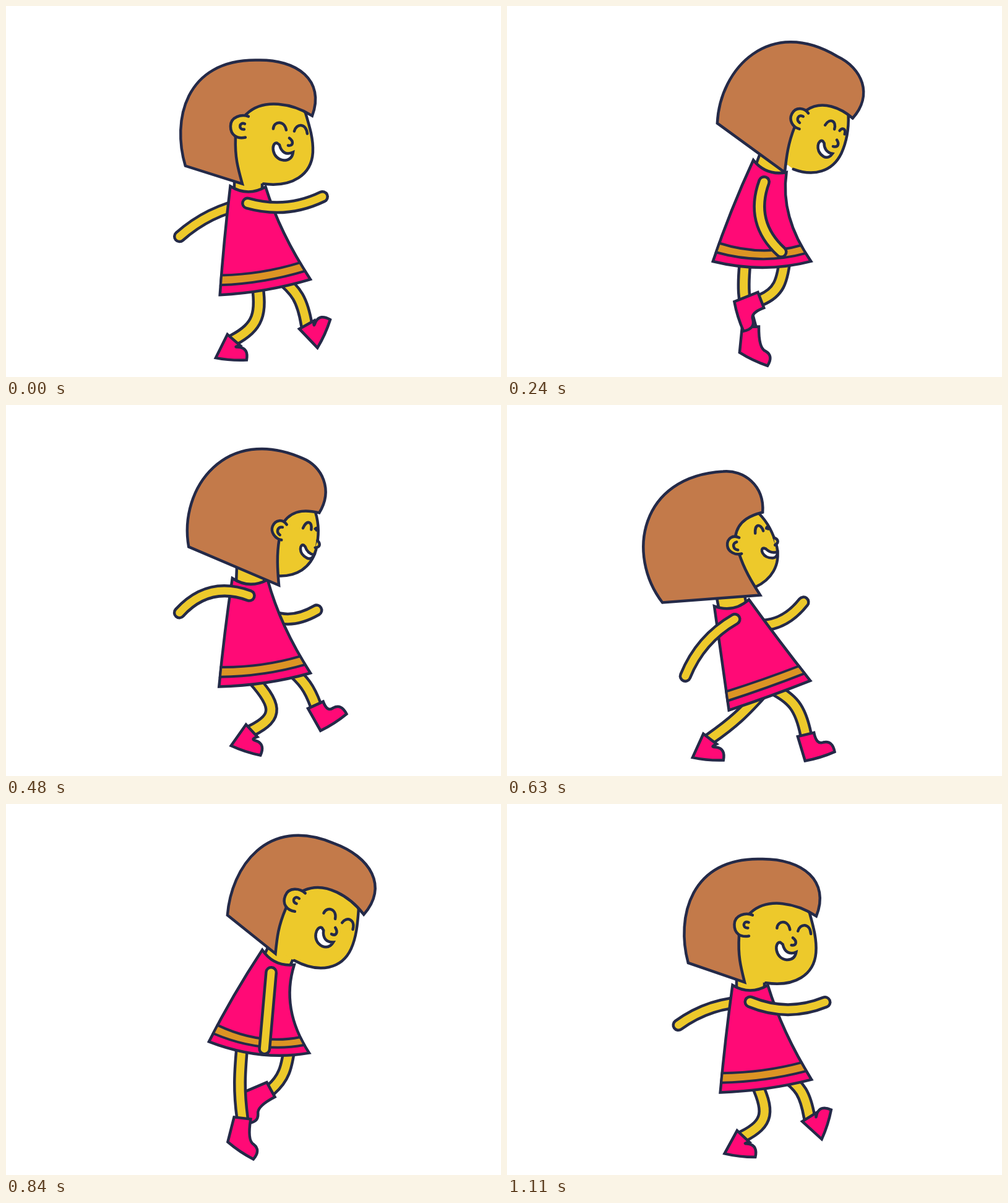
An HTML page with a canvas for the animation above (1140 ms loop, 800x600 px).

```html
<!DOCTYPE html>
<html lang="en">
<head>
<meta charset="utf-8">
<title>Skipping girl</title>
<style>
  html, body { margin: 0; width: 100%; height: 100%; overflow: hidden; background: #fff; }
  canvas { display: block; width: 100vw; height: 100vh; }
</style>
</head>
<body>
<canvas id="stage" width="800" height="600"></canvas>
<script>
const LOOP = 1140, HALF = LOOP / 2, STEP = 30;
const INK = '#242a48', SKIN = '#edc92b', HAIR = '#c37a4a', PINK = '#ff0a76', GOLD = '#dc9424';
const ctx = document.getElementById('stage').getContext('2d');

// Key poses, joined by a periodic cubic. The rest of the rig follows from these.

// time, collar x, collar y, collar tilt, head tilt
const BODY = [
  [0, 391, 292, 1, 17.5], [120, 414, 320, 9.5, 22], [285, 422, 243, 22, 41],
  [360, 406, 247, 20, 46.6], [540, 386, 300, -6, 9], [630, 363, 320, -11, -4.3],
  [700, 387, 319, -1, 6], [840, 440, 248, 25, 38.7], [890, 441, 241, 26, 43],
  [990, 418, 278, 22, 41], [1110, 393, 293, 0, 19]
];
// time, angle from hanging straight down, elbow bend
const SWING = [
  [0, 95, 23], [60, 104, 44], [120, 66, 56], [360, -33, 28], [420, -64, 48], [555, -69, 18],
  [630, -41, 21], [690, -58, 50], [840, -5, 0], [930, 52, 20], [990, 65, 57]
];
// time, hip x, knee, ankle, foot angle
const STRIDE = [
  [0, 405, 417, 513, 368, 540, 4], [60, 418, 374, 508, 328, 540, 5],
  [120, 400, 402, 550, 345, 547, 9], [270, 459, 453, 440, 428, 462, 84],
  [360, 455, 472, 420, 479, 455, 90], [420, 460, 487, 439, 501, 467, 30],
  [555, 444, 479, 463, 487, 511, -72], [630, 424, 472, 479, 483, 533, -17],
  [690, 440, 477, 503, 487, 547, 5], [840, 383, 375, 456, 382, 508, 34],
  [930, 425, 462, 440, 410, 474, 77], [990, 398, 461, 475, 405, 506, 41]
];

// head parts: outline in three-quarter view, outline in profile, fill
const FRONT = { x: 381, y: 287, tilt: 17.5 }, SIDE = { x: 412, y: 310, tilt: -4.3 };
const PARTS = [
  ['M378 282 C372 262 366 235 367 213 C367 150 440 120 483 172 C490 195 496 215 495 236 C493 272 462 293 415 287',
   'M400 293 C388 272 376 250 374 235 C364 190 385 165 410 178 C425 193 434 212 439 232 C445 262 430 285 404 297', SKIN],
  ['M289 258 C267 185 288 86 404 87 C470 85 515 120 494 177 C462 157 415 148 388 174 C375 185 369 200 370 213 C369 245 374 262 381 287 Z',
   'M254 322 C195 245 217 118 352 110 C385 107 419 132 416 176 C400 180 376 188 372 215 C372 225 374 235 378 243 C386 268 398 288 412 310 Z', HAIR],
  ['M391 178 C380 174 362 178 362 194 C362 208 372 215 386 212',
   'M378 217 C368 212 358 218 359 230 C360 240 372 246 382 243', SKIN],
  ['M385 190 C376 186 374 200 384 199', 'M374 224 C366 226 368 236 376 237'],
  ['M431 198 C432 185 449 184 452 200', 'M404 210 C403 194 413 194 417 206'],
  ['M465 202 C468 189 484 188 486 206', 'M422 202 C423 199 424 199 425 203'],
  ['M457 213 C464 218 464 226 455 225', 'M434 217 C440 219 444 224 436 229', SKIN],
  ['M437 221 C427 220 428 247 448 249 C458 249 462 243 463 236 C452 241 444 236 441 224 Z',
   'M418 234 C411 234 415 250 432 250 C438 250 440 245 440 240 C431 243 424 238 421 235 Z', '#fff']
].map(([a, b, fill]) => ({ shape: a, front: local(a, FRONT), side: local(b, SIDE), fill }));

function spin(x, y, deg) {
  const r = deg * Math.PI / 180, c = Math.cos(r), s = Math.sin(r);
  return [x * c - y * s, x * s + y * c];
}

function local(d, view) {
  const n = d.match(/\d+/g).map(Number), out = [];
  for (let i = 0; i < n.length; i += 2) out.push(...spin(n[i] - view.x, n[i + 1] - view.y, -view.tilt));
  return out;
}

const mix = (a, b, k) => a + (b - a) * k;
const angle = (x, y) => Math.atan2(y, x) * 180 / Math.PI;

function ease(u) {
  const k = Math.min(1, Math.max(0, u));
  return k * k * (3 - 2 * k);
}

function sample(rows, time) {
  const n = rows.length, t = (time % LOOP + LOOP) % LOOP;
  let i = n - 1;
  while (rows[i][0] > t) i--;
  const row = k => rows[(k + n) % n];
  const gap = k => (row(k + 1)[0] - row(k)[0] + LOOP) % LOOP;
  const h0 = gap(i - 1), h = gap(i), h1 = gap(i + 1), u = (t - row(i)[0]) / h;
  return row(i).slice(1).map((p, j) => {
    const q = row(i + 1)[j + 1], d = (q - p) / h;
    const before = (p - row(i - 1)[j + 1]) / h0, after = (row(i + 2)[j + 1] - q) / h1;
    const m0 = (before * h + d * h0) / (h + h0) * h;
    const m1 = (d * h1 + after * h) / (h + h1) * h;
    const a = 2 * (p - q) + m0 + m1, b = 3 * (q - p) - 2 * m0 - m1;
    return ((a * u + b) * u + m0) * u + p;
  });
}

function paint(d, fill, line = 4.5) {
  const path = new Path2D(d);
  if (fill) { ctx.fillStyle = fill; ctx.fill(path); }
  ctx.strokeStyle = INK;
  ctx.lineWidth = line;
  ctx.stroke(path);
}

function limb(d, wide, thin) {
  const path = new Path2D(d);
  for (const [color, width] of [[INK, wide], [SKIN, thin]]) {
    ctx.strokeStyle = color;
    ctx.lineWidth = width;
    ctx.stroke(path);
  }
}

// The hem swings against the collar, and the dress shortens as she bows.
function pose(t) {
  const [x, y, tilt, nod] = sample(BODY, t), sway = x - 400;
  const hemX = 417 - .2 * sway, length = 165 - .026 * tilt * tilt;
  return {
    x, y, tilt, nod, hemX,
    hemY: y + Math.sqrt(length ** 2 - (hemX - x) ** 2),
    hemTilt: .6 * sway - .55 * tilt - 3.8,
    hemHalf: 75.5 + .15 * sway
  };
}

function arm(body, t) {
  const [swing, bend] = sample(SWING, t);
  const [ox, oy] = spin(0, 27, body.tilt), [dx, dy] = spin(0, 1, -swing);
  const x = body.x + ox, y = body.y + oy, reach = 124 - bend * bend / 200;
  const cx = x + dx * reach / 2 - dy * bend, cy = y + dy * reach / 2 + dx * bend;
  limb(`M${x} ${y} Q${cx} ${cy} ${x + dx * reach} ${y + dy * reach}`, 21, 12);
}

function leg(body, t) {
  const [hx, kx, ky, ax, ay, foot] = sample(STRIDE, t);
  const hy = body.hemY - 14 + (hx - body.hemX) * Math.tan(body.hemTilt * Math.PI / 180);
  const k = .8;
  limb(`M${hx} ${hy} C${mix(hx, kx, k)} ${mix(hy, ky, k)} ${mix(ax, kx, k)} ${mix(ay, ky, k)} ${ax} ${ay}`, 22, 13);

  // the cuff turns partly with the shin, partly with the foot
  const shin = angle(ax - kx, ay - ky), cuff = mix((shin + 360) % 360 - 90, foot, .35);
  const [ux, uy] = spin(1, 0, cuff), [sx, sy] = spin(1, 0, foot);
  const back = 12 + .25 * (foot - cuff), len = 50;
  const heelX = ax - uy * 41 - ux * back, heelY = ay + ux * 41 - uy * back;
  const at = (along, up) => `${heelX + sx * along + sy * up} ${heelY + sy * along - sx * up}`;
  const edge = w => `${ax + ux * w} ${ay + uy * w}`;
  paint(`M${edge(-13.5)} L${edge(13.5)} Q${at(len - 25, 19)} ${at(len - 13, 20)}
    Q${at(len + 2, 19)} ${at(len, 0)} Q${at(len / 2, -3)} ${at(0, 0)} Z`, PINK);
}

function dress({ x, y, tilt, hemX, hemY, hemTilt, hemHalf }) {
  const [ux, uy] = spin(1, 0, tilt), [bx, by] = spin(hemHalf, 0, hemTilt);
  const collar = (along, up) => [x + ux * along + uy * up, y + uy * along - ux * up];
  paint(`M${collar(-22, -8)} L${collar(-22, 25)} L${collar(23, 25)} L${collar(23, -8)}`, SKIN);

  const bend = 6 + .45 * tilt, sag = 8 + .6 * tilt;
  const side = (dir, pull) => {
    const a = collar(28.5 * dir, 0), b = [hemX + bx * dir, hemY + by * dir];
    const c = [(a[0] + b[0]) / 2 - pull, (a[1] + b[1]) / 2];
    const at = v => a.map((p, i) => mix(mix(p, c[i], v), mix(c[i], b[i], v), v));
    return { a, c, at };
  };
  const left = side(-1, bend / 3), right = side(1, bend * 2);
  const hem = v => {
    const p = left.at(v), q = right.at(v);
    const mid = [(p[0] + q[0]) / 2 + 2, (p[1] + q[1]) / 2 + sag];
    return { out: `${p} Q${mid} ${q}`, back: `${q} Q${mid} ${p}` };
  };
  paint(`M${left.a} Q${collar(0, -17)} ${right.a} Q${right.c} ${hem(1).back} Q${left.c} ${left.a} Z`, PINK);
  paint(`M${hem(.82).out} L${hem(.91).back} Z`, GOLD, 4);
}

// The head pivots on the collar; its parts blend between the two views.
function head({ x, y, nod }, t) {
  const turn = ease((t - 60) / 310) - ease((t - 640) / 230);
  const [ox, oy] = spin(mix(-10, 47, turn), mix(-1.5, -9, turn), nod);
  for (const { shape, front, side, fill } of PARTS) {
    const pts = [];
    for (let i = 0; i < front.length; i += 2) {
      const [px, py] = spin(mix(front[i], side[i], turn), mix(front[i + 1], side[i + 1], turn), nod);
      pts.push(x + ox + px, y + oy + py);
    }
    let i = 0;
    paint(shape.replace(/\d+/g, () => pts[i++].toFixed(2)), fill);
  }
}

function draw(t) {
  ctx.fillStyle = '#fff';
  ctx.fillRect(0, 0, 800, 600);
  ctx.lineCap = 'round';
  ctx.lineJoin = 'miter';
  ctx.miterLimit = 4;
  const body = pose(t);
  arm(body, t + HALF);
  leg(body, t + HALF);
  leg(body, t);
  dress(body);
  head(body, t);
  arm(body, t);
}

const start = performance.now();
function tick() {
  const t = (performance.now() - start) % LOOP;
  draw(Math.floor(t / STEP) * STEP);
  requestAnimationFrame(tick);
}
tick();
</script>
</body>
</html>
```
